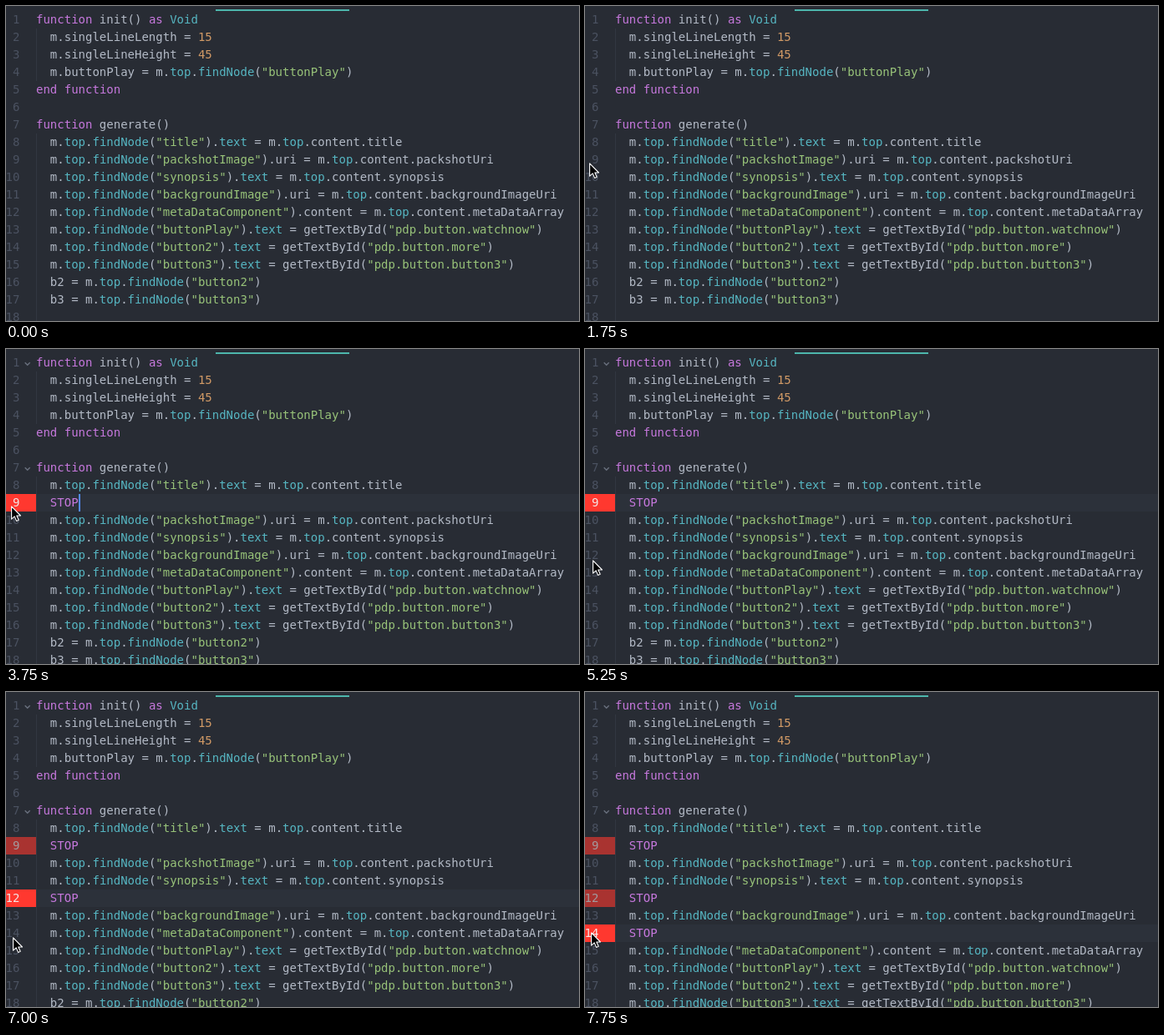
These frames come from a looping animation (686x378 px, 8 s). An HTML page:

```html
<!DOCTYPE html>
<html lang="en">
<head>
<meta charset="utf-8">
<title>Breakpoints in a code editor</title>
<style>
  html, body { margin: 0; width: 100%; height: 100%; overflow: hidden; background: #282c34; }
  svg { display: block; width: 686px; height: 378px; }
  text { font: 14px "DejaVu Sans Mono", monospace; white-space: pre; fill: #b3bac6; }
  .num { fill: #4b5261; text-anchor: end; }
  .hot { fill: #f3e4e4; text-anchor: end; }
  .key { fill: #c678dd; }
  .fn { fill: #56b6c2; }
  .str { fill: #98c379; }
  .lit { fill: #d19a66; }
</style>
</head>
<body>
<svg viewBox="0 0 686 378" xmlns="http://www.w3.org/2000/svg">
  <rect width="686" height="378" fill="#282c34"/>
  <rect x="251" y="4" width="160" height="2" fill="#4db6ac"/>
  <g id="code"></g>
  <g id="folds" fill="none" stroke="#69707d" stroke-width="1.4">
    <path d="M22.7 16.3l3 3l3-3"/>
    <path d="M22.7 142.3l3 3l3-3"/>
  </g>
  <rect id="caret" x="87" width="2" height="21" fill="#528bff"/>
  <path id="mouse" d="M.6 .8V16.2L4.2 12.9L6.6 18.4L9.2 17.3L6.8 12H11.5Z"
    fill="#000" stroke="#fff" stroke-width="1.1" stroke-linejoin="round"/>
</svg>
<script>
const LOOP = 8000, ROW = 21, TOP = 6, LEFT = 36;
const el = id => document.getElementById(id);

const source = `function init() as Void
  m.singleLineLength = 15
  m.singleLineHeight = 45
  m.buttonPlay = m.top.findNode("buttonPlay")
end function

function generate()
  m.top.findNode("title").text = m.top.content.title
  m.top.findNode("packshotImage").uri = m.top.content.packshotUri
  m.top.findNode("synopsis").text = m.top.content.synopsis
  m.top.findNode("backgroundImage").uri = m.top.content.backgroundImageUri
  m.top.findNode("metaDataComponent").content = m.top.content.metaDataArray
  m.top.findNode("buttonPlay").text = getTextById("pdp.button.watchnow")
  m.top.findNode("button2").text = getTextById("pdp.button.more")
  m.top.findNode("button3").text = getTextById("pdp.button.button3")
  b2 = m.top.findNode("button2")
  b3 = m.top.findNode("button3")
  `.split("\n");

// Breakpoints: time added and line number
const stops = [[3750, 9], [5500, 12], [7250, 14]];

// Pointer: time, x, y
const moves = [
  [500, 177, 96], [750, 139, 111], [1000, 39, 174], [1250, 17, 187],
  [1500, 10, 188], [1750, 5, 188], [3500, 6, 188], [4500, 10, 245],
  [4750, 13, 269], [5000, 10, 256], [5250, 9, 253], [5500, 6, 252],
  [6750, 8, 283], [7000, 8, 294], [7250, 7, 295], [7750, 7, 288]
];

const token = /(?<str>"[^"]*")|(?<key>\b(?:function|end|as|STOP)\b)|(?<fn>\b(?:Void|top|findNode|text)\b)|(?<lit>\b\d+\b)/g;

function paint(line) {
  return line.replace(token, (...args) => {
    const groups = args[args.length - 1];
    const kind = Object.keys(groups).find(k => groups[k]);
    return `<tspan class="${kind}">${args[0]}</tspan>`;
  });
}

const rect = (x, y, w, fill) =>
  `<rect x="${x}" y="${y}" width="${w}" height="${ROW}" fill="${fill}"/>`;

const rowTop = n => TOP + (n - 1) * ROW;

function drawCode(marks) {
  const lines = source.slice();
  marks.forEach(n => lines.splice(n - 1, 0, "  STOP"));
  const current = marks[marks.length - 1];

  el("code").innerHTML = lines.slice(0, 18).map((line, i) => {
    const n = i + 1, y = rowTop(n), base = y + 15;
    const marked = marks.includes(n);
    let out = n === current ? rect(LEFT, y, 650, "#2c313a") : "";
    if (line.startsWith("  ")) out += rect(LEFT, y, 1, "#323741");
    const label = `<text class="${marked ? "hot" : "num"}" x="16.4" y="${base}">${n}</text>`;
    out += marked
      ? `<g opacity="${n === current ? 1 : 0.6}">${rect(0, y, LEFT, "#ff382f")}${label}</g>`
      : label;
    return out + `<text x="${LEFT}" y="${base}">${paint(line)}</text>`;
  }).join("");
}

const show = (node, on) => node.setAttribute("visibility", on ? "visible" : "hidden");

let drawn = -1;

function render(t) {
  const active = stops.filter(s => t >= s[0]);
  if (active.length !== drawn) {
    drawn = active.length;
    drawCode(active.map(s => s[1]));
  }

  show(el("folds"), t >= 3500);

  const last = active[active.length - 1];
  show(el("caret"), last && (t - last[0]) % 1000 < 500);
  if (last) el("caret").setAttribute("y", rowTop(last[1]));

  const pos = moves.filter(m => t >= m[0]).pop();
  show(el("mouse"), pos);
  if (pos) el("mouse").setAttribute("transform", `translate(${pos[1]} ${pos[2]})`);
}

const start = performance.now();
function tick() {
  render((performance.now() - start) % LOOP);
  requestAnimationFrame(tick);
}
tick();
</script>
</body>
</html>
```
